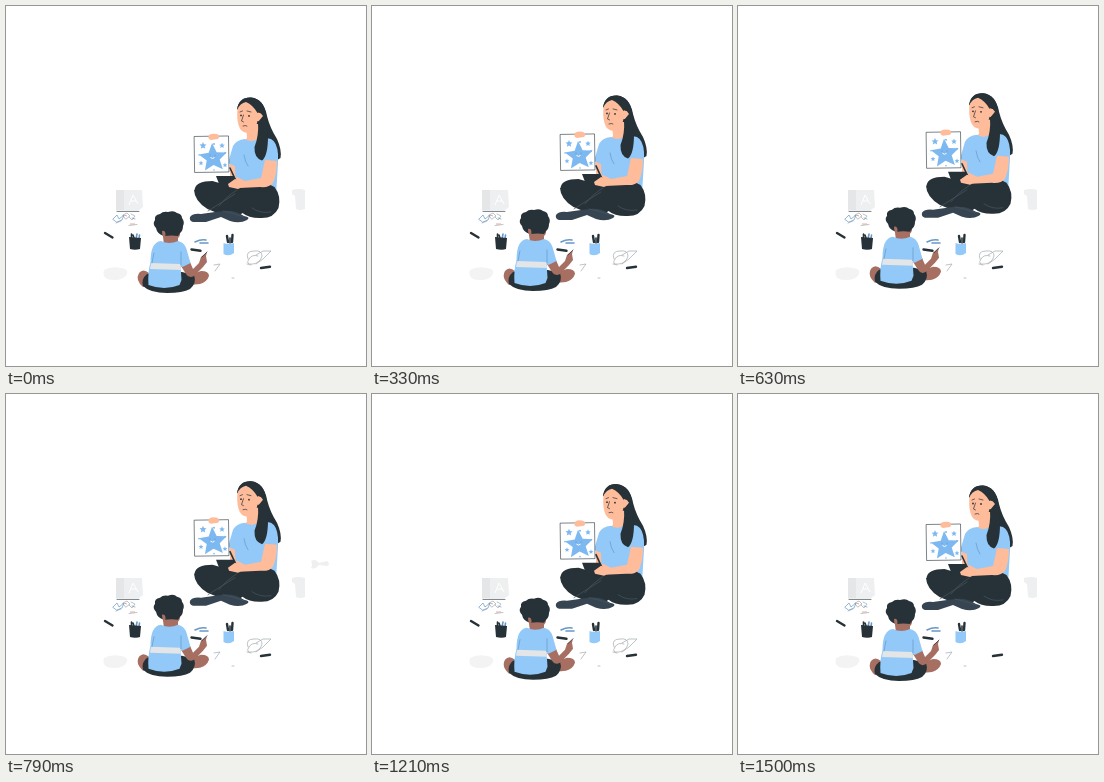
An HTML page that plays this animation: 360 px wide and 360 px high, repeating every 1540 ms.

```html
<!DOCTYPE html>
<html lang="en">
<head>
<meta charset="utf-8">
<title>Drawing lesson</title>
<style>
  html, body { margin: 0; width: 100%; height: 100%; overflow: hidden; background: #fff; }
  svg { display: block; width: 100vw; height: 100vh; }
  .blue { fill: #92c9f8; }
  .star { fill: #7db9f0; }
  .ink { fill: #263238; }
  .shoe { fill: #374552; }
  .skin { fill: #ffbc9b; }
  .brown { fill: #a76e62; }
  .pale { fill: #eeeff0; }
  .line { fill: none; stroke: #263238; stroke-width: .7; stroke-linecap: round; stroke-linejoin: round; }
  .soft { stroke: #6798c6; }
  .fold { stroke: #4a575f; }
  .faint { stroke: #a3a9ae; }
  .mid { stroke-width: 1.6; }
  .thick { stroke-width: 2.4; }
</style>
</head>
<body>
<svg viewBox="0 0 360 360">
  <defs>
    <path id="star" d="M0-14L4-4.500 14-3.500 6.500 3 9 13 0 8-9 13-6.500 3-14-3.500-4-4.500Z"/>
  </defs>

  <!-- things on the floor -->
  <g>
    <path class="pale" d="M110 184h26l1 17-5 4h-22z"/>
    <path fill="#e4e6e8" d="M110 184h8v20h-8z"/>
    <path class="line fold" d="M111 205.500h22"/>
    <path fill="none" stroke="#fff" d="M123 199l4-10 5 9M125 195h5"/>
    <path class="line faint" d="M117 209l4-2 3 3-4 3zM125 208l4 2-3 4-3-3M123 219.500l8-1M110 217l5-2"/>
    <path class="line soft" d="M107 213l4-4 2 4 5-4-2 5-5 2zM126 212l3 1"/>
    <path fill="none" stroke="#e0aaa2" d="M118 209l3 1M124 218h5"/>
    <path class="line thick" d="M99 227l7.500 4.500"/>
    <path class="line mid" d="M125.500 233v-5M128 232l-1-3"/>
    <path class="line mid soft" d="M130 233l1-5M133 233l.5-4"/>
    <path class="ink" d="M123 231l12 1-1 11q-5 1.500-10 0z"/>
    <path fill="#f3f3f3" d="M98 264q7-4 17-2 8 1 6 6-3 6-13 6-13 0-10-10z"/>
    <path class="line mid soft" d="M189 236q6-3 11-2M194 237h8"/>
    <path class="line thick" d="M185.500 243.500l9 1.300"/>
    <path class="line thick" d="M222 236l-1-6M226 236l.5-7"/>
    <path class="line mid" d="M224 237v-5"/>
    <path class="blue" d="M217.500 237q5 2 10.500 0v10q-5 4-10.500 1z"/>
    <path class="line faint" d="M208 259l6-1-5 7M226 272h2"/>
    <path class="line thick" d="M255 262l9-1.300"/>
    <path id="sketch" class="line faint" d="M242 253q-3-8 6-8 8-1 8 5-2 7-9 8-8 1-4-5 3-5 9-3M241 258l4 1M250 249l7-4h8l-8 8-7 5"/>
    <path id="cup" class="pale" d="M286 184q7-2 13 0v19q-5 2-9 0l-1-13-3-2z"/>
    <path id="scrap" class="pale" d="M305 167q5-3 8 2l8-2q4 3 0 5l-8-1q-4 5-8 3 2-3 0-7z"/>
  </g>

  <g class="bob">
    <!-- teacher -->
    <path class="ink" d="M231 103Q233 91 245 91.500 258 93 261 110 264 122 271 133 276 144 274.500 152L268 156 250 150 246 130 251 111Z"/>
    <path class="skin" d="M224 153l8 2-2 20-6-4z"/>
    <path class="skin" d="M240 118h13v14l5 4-14 4-6-5 3-3z"/>
    <path class="blue" d="M239 133q-9 1-12 7l-5 17 7 3 1 22 12 8h28l2-33v-9q-1-12-7-15l-10-2q-9 7-16 2z"/>
    <path class="skin" d="M231.500 103q1-7 9-8 10 1 13 12 4-1 3.500 4-2 5-5.500 4-2 11-9 12-8 0-10-8-2-7-1-16z"/>
    <path class="ink" d="M231 104Q233 91 245 91.500 258 93 260.500 110 262 120 262 130 262 150 256 154.500 248 152 248.500 141 253 130 252 116L257 110Q254 105 251.500 107 247 99 240 96 234 97 231 104Z"/>
    <path class="line" d="M234 106l2.500-1M241 105l4 1M237.500 109l-2 6 2 1M237 120q3-1 4 0"/>
    <g class="ink"><circle cx="235" cy="109.500" r=".9"/><circle cx="243" cy="110" r=".9"/></g>
    <path class="line soft" d="M238 149q1 7 4 11M260 157l-1 8"/>

    <path class="ink" d="M188.500 184q1-9 18-9l24 7q11-9 26-7l12 6q7 9 4 21-5 11-19 10-11 0-17-5-7 6-18 3l-17-7q-13-8-13.500-19z"/>
    <path class="shoe" d="M184 211q3-4 11-3l14-2 9-1q11-1 20 5 7 1 3 4-7 4-17 1l-9-4-15 5h-13q-4-1-3-5z"/>
    <path class="line fold" d="M202 205l27-17M231 184q-11 7-18 16M217 205q10 2 21 6M246 202q8 6 19 4"/>

    <path class="line" style="fill: #fff; stroke-width: .6" d="M188.500 130.500l34-.5.500 36-34 .5z"/>
    <g class="star">
      <use href="#star" transform="translate(207 151) rotate(-4)"/>
      <use href="#star" transform="translate(197 139.500) scale(.25)"/>
      <use href="#star" transform="translate(216 139.500) scale(.2)"/>
      <use href="#star" transform="translate(195 157) scale(.17)"/>
      <use href="#star" transform="translate(219 159) scale(.17)"/>
      <circle cx="208" cy="138" r="1"/><circle cx="193" cy="149" r=".8"/>
      <circle cx="219" cy="147" r="1"/><circle cx="208" cy="164" r=".8"/>
    </g>
    <path class="line soft" d="M204 149v1M209 149v1"/>
    <path fill="none" stroke="#fff" d="M204.500 151.500q2 2 4 0"/>
    <path class="skin" d="M203 129q3-2 8-1 4 2 1 5l-7 1q-4-1-2-5z"/>

    <path class="skin" d="M259 154l12 1q0 13-4 22-4 5-13 4l-21 1-10-2q-4-2 0-4l8-5 8 4 16-3z"/>
    <path class="ink" d="M210 170h18l7 12-20 1z"/>
    <path class="line mid" d="M224 162l6 13"/>
    <path class="skin" d="M222 178l7-5 7 2 3 5-7 3-9-2z"/>
  </g>

  <g class="bob">
    <!-- pupil -->
    <path class="brown" d="M133 267q4-5 10 0l2 12-8 2q-8-7-4-14zM186 268l9-3q8 0 8 5-2 6-9 8l-10 1z"/>
    <path class="ink" d="M141 268q-6 5-4 12 7 7 24 7 16 0 23-4 7-6 4-14l-12-3z"/>
    <path class="brown" d="M156 222h18q1 8-2 10v7h-14zM175 260l9-4 3 7 6-6 2-6 6-5-1 4 1 6-4 5-9 9q-5 3-8-2z"/>
    <path class="line" d="M196 251l5-5"/>
    <path class="blue" d="M155 235q8 4 17 0 6 1 8.500 8l4 14-8 4-2-2 1 15-2 5q-15 6-31 0-1-12 2-23 0-20 10.500-21z"/>
    <path fill="#e3e5e7" d="M145 257l29 1 1 6-31-1z"/>
    <path class="line soft" d="M175 246v13M148 247l-2 10"/>
    <path class="ink" d="M150 222q-4-4-1-8-1-5 5-6 3-3 8-2 6-2 9 1 5 1 5 5 3 4 1 8 0 5-3 7l-2 3q-6-1-14 0-7-2-8-8z"/>
    <path class="brown" d="M156 225q3-1 3.500 3l-.5 4q-3-1-3-7z"/>
  </g>
</svg>
<script>
  const LOOP = 1540, LIFT = 4.4, LEAD = 40;
  const people = document.querySelectorAll('.bob');
  const show = (id, on) => document.getElementById(id).setAttribute('visibility', on ? 'visible' : 'hidden');

  function draw(now) {
    const t = now % LOOP;
    const y = -LIFT * (1 - Math.cos(2 * Math.PI * (t + LEAD) / LOOP)) / 2;
    people.forEach(p => p.setAttribute('transform', `translate(0 ${y.toFixed(2)})`));
    // pale scraps come and go
    show('cup', t < 210 || t > 440 && t < 900 || t > 1380);
    show('scrap', t > 700 && t < 900);
    show('sketch', t < 1400);
    requestAnimationFrame(draw);
  }
  requestAnimationFrame(draw);
</script>
</body>
</html>
```
